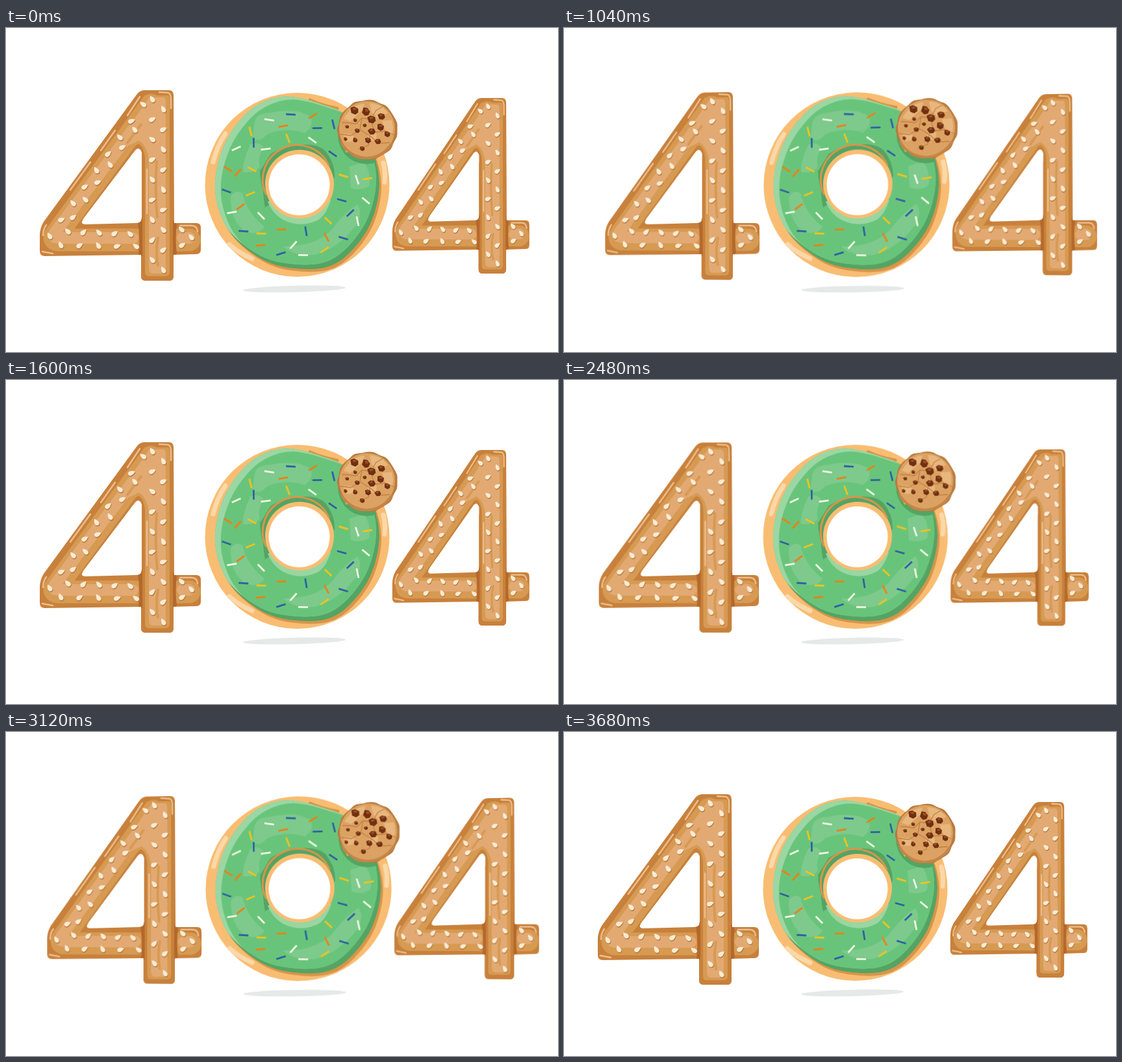
These frames come from a looping animation (850x500 px, 4 s). An HTML page:

```html
<!DOCTYPE html>
<html lang="en">
<head>
<meta charset="utf-8">
<title>404</title>
<style>
html, body { margin: 0; width: 100%; height: 100%; overflow: hidden; background: #fff; }
#art { position: absolute; left: 0; top: 0; transform-origin: 410px 300px; }
</style>
</head>
<body>
<svg id="art" width="850" height="500" viewBox="0 0 850 500" fill="none" stroke-linecap="round" stroke-linejoin="round">
  <defs>
    <clipPath id="fourClip"><path id="fourShape" clip-rule="evenodd" fill-rule="evenodd" d="M213 96H251Q257 96 258 103L259 301H293Q300 301 300 308V342Q300 349 293 349L258 350V383Q258 390 251 390H215Q208 390 208 383V350L60 352Q52 352 52 344V320Q52 309 58 299L201 103Q206 96 213 96ZM209 192Q205 181 198 190L120 293Q113 303 122 303L201 301Q209 301 209 293Z"/></clipPath>
    <clipPath id="icingClip"><path id="icing"/></clipPath>
    <clipPath id="cookieClip"><path id="cookie"/></clipPath>
    <g id="four">
      <use href="#fourShape" fill="#c8813c"/>
      <g clip-path="url(#fourClip)">
        <path stroke="#d69a52" stroke-width="35" d="M224 119L79 316Q70 328 82 327H282"/>
        <path stroke="#e2a973" stroke-width="18" d="M218 127L78 312Q66 325 84 324H195M272 324H282"/>
        <path stroke="#c8813c" stroke-width="50" stroke-linecap="butt" d="M233 205V390"/>
        <path fill="#b4682b" d="M203 299L210 292V352L204 350Q207 325 203 299ZM257 297L263 303Q260 325 263 348L257 352Z"/>
        <path fill="#d69a52" d="M213 104H249Q252 104 252 112V376Q252 383 246 383H219Q214 383 214 376V200Q212 182 204 179L193 184L180 170Z"/>
        <path fill="#e2a973" d="M221 107H242Q246 107 246 116V372Q246 379 240 379H226Q220 379 220 370V205Q217 180 204 174L190 181L174 173Z"/>
        <path stroke="#d69a52" stroke-width="4" d="M232 206Q229 255 233 292M234 324Q230 345 234 366M208 149L187 177"/>
        <path stroke="#edbd8c" stroke-width="2.5" d="M206 106L187 135M168 158L146 189M130 207L99 250M62 304Q57 311 57 320M56 345L72 348M236 99L250 100Q254 102 254 110V124M217 218V286M268 305H286Q294 305 295 314"/>
      </g>
      <g id="seeds"></g>
    </g>
  </defs>

  <ellipse cx="444" cy="402.7" rx="79" ry="5" fill="#e5e9e8" transform="rotate(-1.5 444 402.7)"/>
  <use href="#four"/>
  <use href="#four" transform="matrix(.851 0 0 .9215 550.6 19.5)"/>

  <circle cx="448.500" cy="242" r="142" fill="#f8bd72"/>
  <use href="#icing" fill="#d89549" transform="translate(3 4)"/>
  <path stroke="#d89549" stroke-width="5" d="M468 111Q487 120 510 124"/>
  <path stroke="#fbd8a9" stroke-width="7" d="M319 207Q325 182 338 163M344 334Q358 347 379 356M581 208Q585 223 583 238"/>

  <g clip-path="url(#icingClip)">
    <use href="#icing" fill="#54a464"/>
    <g transform="translate(-5 -7)" clip-path="url(#icingClip)">
      <use href="#icing" fill="#9ad7a4"/>
      <use href="#icing" fill="#69c47b" transform="translate(14 12)"/>
    </g>
    <g fill="#7dca8c">
      <path d="M382 151Q382 132 405 131Q448 122 469 137Q475 151 460 162Q430 152 402 164Q390 178 380 169Z"/>
      <path d="M376 180Q390 174 397 185Q386 201 391 214Q383 225 365 222Q363 209 376 180Z"/>
      <path d="M346 260Q354 248 364 255Q371 285 398 307Q391 320 369 315Q345 297 346 260Z"/>
      <path d="M427 337Q474 338 500 313Q520 286 541 272Q550 284 540 303Q514 339 476 350Q443 353 427 337Z"/>
      <path d="M529 214L551 207Q563 224 559 244Q547 252 531 247Z"/>
    </g>
    <ellipse cx="555" cy="165" rx="44" ry="45" fill="#54a464"/>
  </g>
  <path fill="#54a464" d="M399 277Q396 264 396 251Q391 235 391 221Q399 208 407 195Q426 181 453 180Q480 178 492 190Q507 209 506 231L452 241Z"/>
  <path fill="#98d6a2" d="M403 268L452 250L500 266Q493 288 481 296Q455 309 429 297Q411 288 403 268Z"/>
  <circle cx="452" cy="241" r="53" fill="#f8bd72"/>
  <path stroke="#d89549" stroke-width="3" d="M400 256A53 53 0 0 1 497 212"/>
  <circle cx="451.500" cy="242" r="47" fill="#fff"/>
  <g id="sprinkles" stroke-width="2.8" stroke-linecap="butt"></g>

  <use href="#cookie" fill="#b97b3d"/>
  <g clip-path="url(#cookieClip)">
    <circle cx="556" cy="156" r="43" fill="#dca263"/>
    <path fill="#e8b77d" d="M520 140Q534 117 552 117L549 127L530 144ZM560 116Q578 117 588 131L572 139L563 130ZM579 143L594 142Q598 155 594 166L584 158ZM560 158L571 164L569 176L557 170ZM518 163L532 164L541 174L525 176Z"/>
    <path stroke="#c08043" stroke-width="1.3" d="M518 146Q529 146 539 148L548 139L562 141L570 127L579 122M562 141L567 161L584 159L597 165M548 139L545 157L531 166L515 164M545 157L560 166L558 181L543 187M560 166L574 178L590 177"/>
    <path stroke="#c58547" stroke-width="4" d="M516 177Q527 198 554 201Q580 200 594 178"/>
  </g>
  <g id="chips"></g>
</svg>

<script>
const $ = id => document.getElementById(id);
const times = (n, draw) => Array.from({ length: n }, (_, i) => draw(i)).join('');
const polar = (x, y, r, deg) => {
  const a = deg * Math.PI / 180;
  return [x + r * Math.cos(a), y + r * Math.sin(a)];
};

let seed = 7;
const random = () => (seed = seed * 16807 % 2147483647) / 2147483647;

// Smooth closed curve through a flat list of x, y pairs.
function smooth(list) {
  const n = list.length / 2;
  const at = i => { const j = (i + n) % n * 2; return [list[j], list[j + 1]]; };
  let d = `M${at(0)}`;
  for (let i = 0; i < n; i++) {
    const [a, b, c, e] = [at(i - 1), at(i), at(i + 1), at(i + 2)];
    d += `C${b.map((v, k) => v + (c[k] - a[k]) / 6)} ${c.map((v, k) => v - (e[k] - b[k]) / 6)} ${c}`;
  }
  return d + 'Z';
}

$('icing').setAttribute('d', smooth([
  440,106, 487,118, 526,136, 562,185, 575,240, 563,298, 534,342, 500,367,
  455,372, 400,360, 350,322, 326,275, 323,225, 340,172, 372,130, 406,110]));

$('cookie').setAttribute('d', smooth(Array.from({ length: 28 }, (_, i) =>
  polar(556.5, 157, 46 + 0.9 * Math.sin(i * 2.4), i * 360 / 28)).flat()));

// Seeds stand in evenly spaced lanes along the strokes of the digit.
const DROP = 'd="M-6.5 -.5Q-1 -4.5 3 -3.6Q6 -2.5 5.5 .5Q4.5 3.7 1 3.5Q-3 3 -6.5 -.5Z"';
function lane(x, y, dx, dy, count) {
  return times(count, i => {
    const px = x + dx * i, py = y + dy * i;
    const turn = (i % 2 ? 145 : 50) + random() * 30 - 15;
    return `<path ${DROP} fill="#b9783a" transform="translate(${px + .7} ${py + 1.3}) rotate(${turn})"/>` +
      `<path ${DROP} fill="#faebd3" transform="translate(${px} ${py}) rotate(${turn}) scale(.95)"/>`;
  });
}
$('seeds').innerHTML =
  lane(211, 118, -18, 25.4, 9) + lane(198, 157, -19, 27, 6) +
  lane(225, 110, 0, 31, 9) + lane(242, 125.5, 0, 31, 9) +
  lane(95, 314, 24, 1, 5) + lane(84, 335, 29, 0.5, 5) +
  lane(270, 311, 1, 24, 2) + lane(285, 323, 0, 0, 1);

// Each ring spreads one sprinkle per letter evenly around the hole.
const COLORS = { B: '#2e62a4', O: '#ea8117', Y: '#f1c21c', W: '#f0f7e2' };
function ring(radius, from, letters) {
  return times(letters.length, i => {
    const [x, y] = polar(448, 242, radius, from + i * 360 / letters.length);
    return `<path d="M-7.5 0H7.5" stroke="${COLORS[letters[i]]}" ` +
      `transform="translate(${x} ${y}) rotate(${random() * 150 - 60})"/>`;
  });
}
$('sprinkles').innerHTML =
  ring(109, 265, 'BOBWOYWWBYWBOBWBOWYW') + ring(73, 259, 'YWBYBYBOWYYW') + ring(93, 257, 'OBYWBOWYOOB');

// Chocolate chips follow a sunflower spiral.
$('chips').innerHTML = times(16, i => {
  const [x, y] = polar(554, 155, 9 * Math.sqrt(i + 0.3), 250 + i * 137.5);
  return `<g transform="translate(${x} ${y}) rotate(${i * 67 % 60 - 20}) scale(${3 + i * 3 % 5 * 0.9})">` +
    '<path fill="#702f10" d="M-1 -.5L-.2 -.9L.8 -.6L1 .3L.4 .9L-.6 .7Z"/>' +
    '<path fill="#985128" d="M-.6 -.4L0 -.7L.5 -.4L-.1 0Z"/></g>';
});

// The scene tilts away and back twice per loop, in even steps.
const LOOP = 4000, STEP = 80, RISE = 640, STARTS = [320, 2400], TILT = 1.05e-4;

function frame() {
  const t = Math.floor(performance.now() % LOOP / STEP) * STEP;
  const p = Math.max(0, ...STARTS.map(s => 1 - Math.abs(t - s - RISE) / RISE));
  $('art').style.transform = p ? `matrix3d(1,0,0,${-TILT * p},0,1,0,0,0,0,1,0,0,0,0,1)` : 'none';
  requestAnimationFrame(frame);
}
frame();
</script>
</body>
</html>
```
